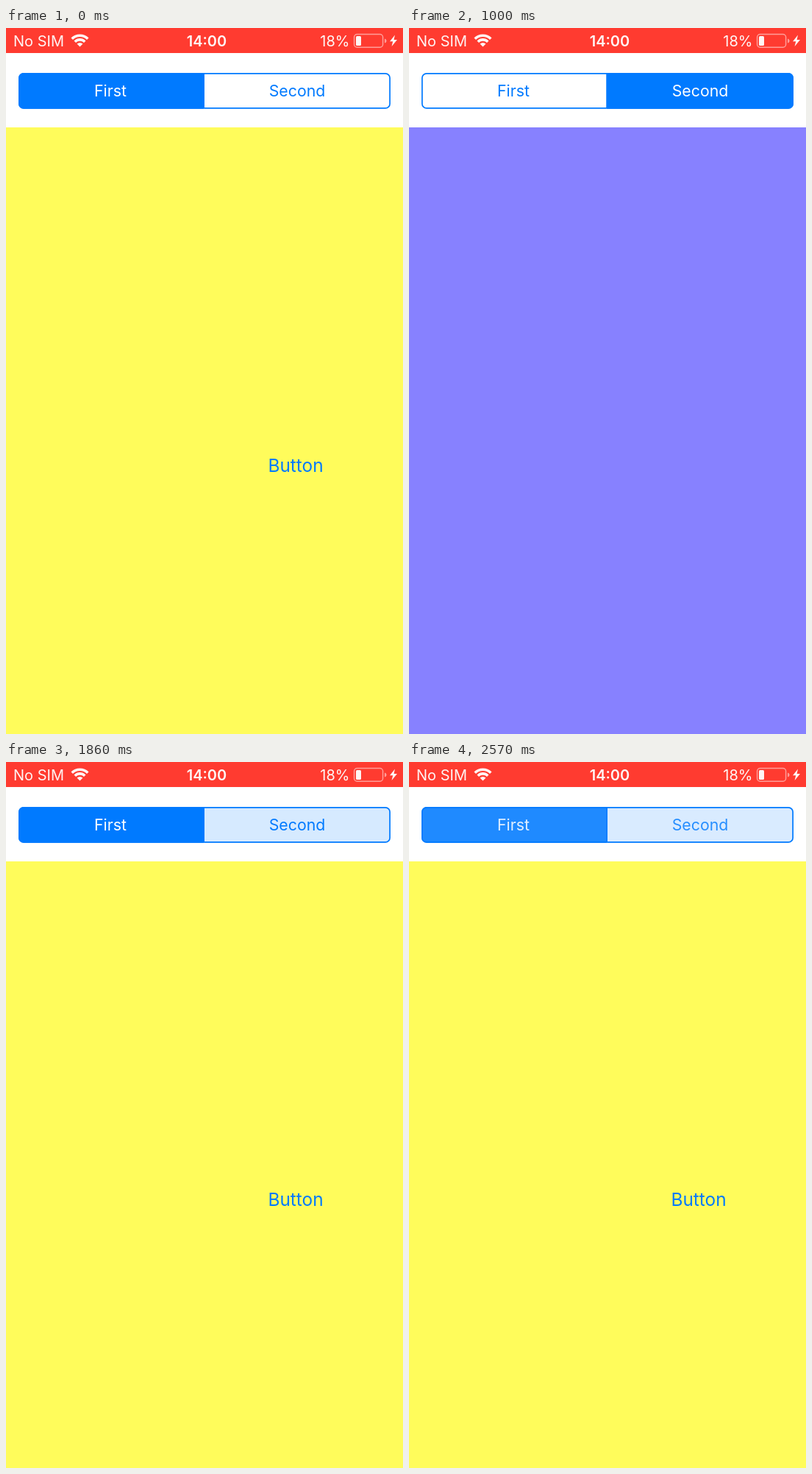
Recreate the animation shown at these times as an HTML page. Size 540 by 959 pixels, loop 2710 ms.

```html
<!DOCTYPE html>
<html lang="en">
<head>
<meta charset="utf-8">
<title>Segmented control</title>
<style>
  html, body { margin: 0; width: 100%; height: 100%; overflow: hidden; background: #fff; }

  svg {
    display: block; width: 100%; height: 100%;
    font-family: Inter, Roboto, sans-serif;
    --blue: #007aff;
    --yellow: #fffc5b;
    --purple: #8781ff;
    animation: taps 2710ms step-end infinite;
  }

  .status { fill: #fff; fill-opacity: .95; font-size: 20px; }
  .clock { font-weight: 600; text-anchor: middle; }
  .label { font-size: 21.3px; text-anchor: middle; }
  .button { font-size: 24.4px; text-anchor: middle; fill: var(--blue); visibility: var(--button); }
  .page { fill: var(--page); }
  .outline { fill: none; stroke: var(--blue); stroke-width: 1.7; }

  /* Each segment cross-fades between a blue and a white face. */
  .segment { fill: color-mix(in srgb, var(--blue) var(--fill), white); }
  .label { fill: color-mix(in srgb, white var(--ink), var(--blue)); }
  .first { --fill: var(--fill1); --ink: var(--ink1); }
  .second { --fill: var(--fill2); --ink: var(--ink2); }

  @keyframes taps {
    0%     { --page: var(--yellow); --button: visible; --fill1: 100%; --ink1: 100%; --fill2: 0%; --ink2: 0%; }
    26.19% { --page: var(--yellow); --button: visible; --fill1: 100%; --ink1: 100%; --fill2: 16%; --ink2: 0%; }
    31.73% { --page: var(--purple); --button: hidden; --fill1: 32%; --ink1: 32%; --fill2: 73%; --ink2: 68%; }
    36.89% { --page: var(--purple); --button: hidden; --fill1: 0%; --ink1: 0%; --fill2: 100%; --ink2: 100%; }
    52.76% { --page: var(--purple); --button: hidden; --fill1: 16%; --ink1: 0%; --fill2: 100%; --ink2: 100%; }
    57.93% { --page: var(--yellow); --button: visible; --fill1: 96%; --ink1: 96%; --fill2: 5%; --ink2: 5%; }
    63.09% { --page: var(--yellow); --button: visible; --fill1: 100%; --ink1: 100%; --fill2: 0%; --ink2: 0%; }
    68.63% { --page: var(--yellow); --button: visible; --fill1: 100%; --ink1: 100%; --fill2: 16%; --ink2: 0%; }
    73.8%  { --page: var(--purple); --button: hidden; --fill1: 64%; --ink1: 64%; --fill2: 46%; --ink2: 46%; }
    78.96% { --page: var(--purple); --button: hidden; --fill1: 3%; --ink1: 3%; --fill2: 97%; --ink2: 97%; }
    84.5%  { --page: var(--purple); --button: hidden; --fill1: 0%; --ink1: 0%; --fill2: 100%; --ink2: 100%; }
    89.66% { --page: var(--purple); --button: hidden; --fill1: 16%; --ink1: 0%; --fill2: 100%; --ink2: 100%; }
    94.83% { --page: var(--yellow); --button: visible; --fill1: 88%; --ink1: 88%; --fill2: 15%; --ink2: 15%; }
    100%   { --page: var(--yellow); --button: visible; --fill1: 100%; --ink1: 100%; --fill2: 0%; --ink2: 0%; }
  }
</style>
</head>
<body>
<svg viewBox="0 0 540 959" preserveAspectRatio="none">
  <defs>
    <clipPath id="control"><rect x="17" y="61" width="506" height="48.8" rx="7"/></clipPath>
    <clipPath id="fan"><path d="M100.5 25.5 L87.5 12.5 V0 H113.5 V12.5 Z"/></clipPath>
  </defs>

  <rect width="540" height="959" fill="#fff"/>
  <rect class="page" y="135" width="540" height="824"/>

  <rect width="540" height="34" fill="#ff3b30"/>
  <g class="status">
    <text x="10" y="25">No SIM</text>
    <g clip-path="url(#fan)">
      <g fill="none" stroke="#fff" stroke-opacity=".95" stroke-width="3.6">
        <circle cx="100.5" cy="25.5" r="15.3"/>
        <circle cx="100.5" cy="25.5" r="9.6"/>
      </g>
      <circle cx="100.5" cy="25.5" r="5.6"/>
    </g>
    <text class="clock" x="273" y="25">14:00</text>
    <text x="467.5" y="25" text-anchor="end">18%</text>
    <rect x="473.6" y="8.6" width="39" height="17.6" rx="4" fill="none" stroke="#fff" stroke-opacity=".5" stroke-width="1.5"/>
    <rect x="476" y="11" width="7" height="13" rx="1.5"/>
    <path d="M515 14.4 Q517.6 15 517.6 17.4 T515 20.4 Z" fill-opacity=".5"/>
    <path d="M529 9.5 L522 18.3 H526.2 L524.6 25 L532 15.9 H527.6 Z"/>
  </g>

  <g clip-path="url(#control)">
    <rect class="segment first" x="17" y="61" width="252" height="49"/>
    <rect class="segment second" x="269" y="61" width="254" height="49"/>
  </g>
  <path class="outline" d="M269.1 62 V109"/>
  <rect class="outline" x="17.85" y="61.85" width="504.3" height="47.1" rx="6"/>
  <text class="label first" x="142" y="93">First</text>
  <text class="label second" x="396" y="93">Second</text>

  <text class="button" x="394" y="603">Button</text>
</svg>
</body>
</html>
```
